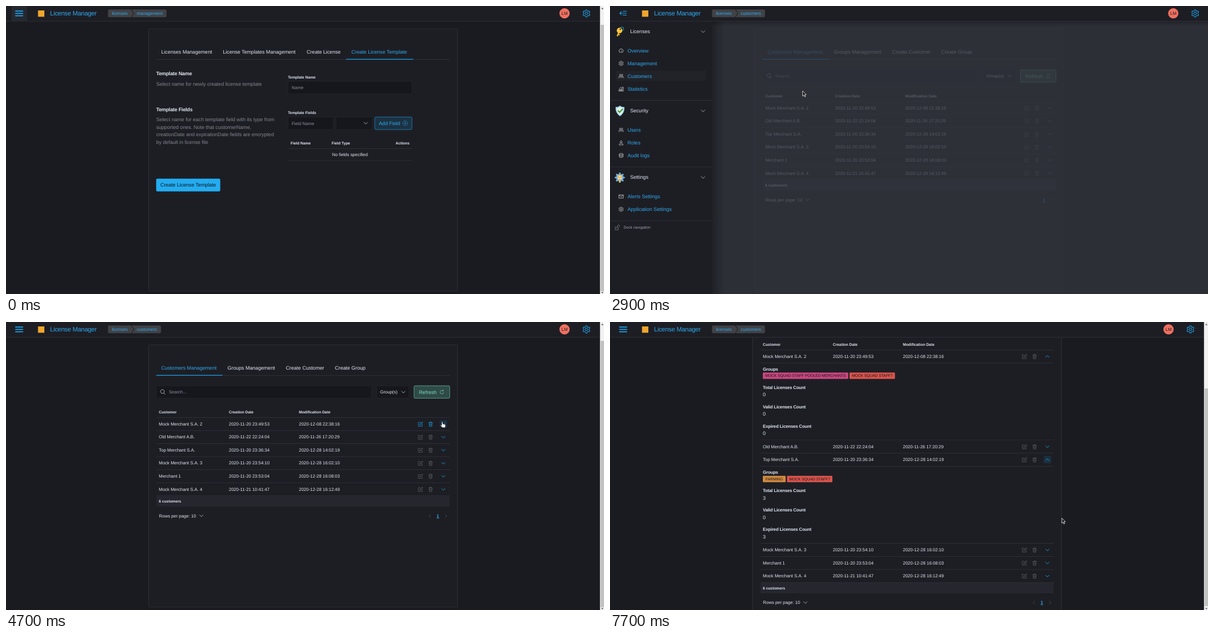
These frames come from a looping animation (1076x520 px, 8000 ms). An HTML page:

```html
<!DOCTYPE html>
<html lang="en">
<head>
<meta charset="utf-8">
<title>License Manager</title>
<style>
  html, body { margin: 0; width: 100%; height: 100%; overflow: hidden; background: #1a1b20; }
  svg { display: block; }
  text { font-family: "Liberation Sans", Arial, sans-serif; letter-spacing: -.005em; white-space: pre; text-rendering: geometricPrecision; }
  .title { font-weight: 700; letter-spacing: -.023em; }
  .logo { letter-spacing: -.025em; }
  .bold { font-weight: 700; }
  .line { text-decoration: underline; }
</style>
</head>
<body>
<script>
const LOOP = 8000, STEP = 100;
const BLUE = '#1ba9f5', LINK = '#2fa8ee', TEXT = '#dfe5ef', DIM = '#81858f', RULE = '#343741', PANEL = '#1d1e24';
const S = 9.184, M = 8.036, XS = 6.888;

const el = (parent, tag, attrs = {}) => {
  const n = document.createElementNS('http://www.w3.org/2000/svg', tag);
  for (const k in attrs) n.setAttribute(k, attrs[k]);
  parent.appendChild(n);
  return n;
};
const set = (n, attrs) => { for (const k in attrs) n.setAttribute(k, attrs[k]); };
const show = (n, on) => n.setAttribute('display', on ? 'inline' : 'none');
const move = (n, x, y) => n.setAttribute('transform', `translate(${x} ${y})`);
const group = parent => el(parent, 'g');
const rect = (p, x, y, w, h, fill, more = {}) => el(p, 'rect', { x, y, width: w, height: h, fill, ...more });
const hline = (p, x1, x2, y, color = RULE, w = .7) => rect(p, x1, y - w / 2, x2 - x1, w, color);
const path = (p, d, more) => el(p, 'path', { d, fill: 'none', ...more });

// y is the middle of the capitals
function text(p, x, y, str, size = S, fill = TEXT, cls = '', anchor = 'start') {
  const n = el(p, 'text', { x, y: y + size * .34, 'font-size': size, fill, class: cls, 'text-anchor': anchor });
  n.textContent = str;
  return n;
}

function gearPath(r, teeth = 6) {
  let d = '';
  for (let i = 0; i < teeth * 8; i++) {
    const a = i / (teeth * 8) * Math.PI * 2;
    const q = r * (.86 + .14 * Math.tanh(3 * Math.cos(a * teeth)));
    d += `${i ? 'L' : 'M'}${(8 + q * Math.sin(a)).toFixed(2)} ${(8 - q * Math.cos(a)).toFixed(2)}`;
  }
  return d + 'Z';
}

const ICONS = {
  gauge: 'M3 13A6.5 6.5 0 1 1 13 13ZM8 10l3-4',
  people: 'M5 2a2 2 0 1 1-.01 0M11 2a2 2 0 1 1-.01 0M1 14v-3l2-3h4l1 2 1-2h4l2 3v3M5 10v4M11 10v4',
  stats: 'M1 15v-4h4v4zM6 15V9h4v6zM11 15V3h4v12zM1 8l8-6',
  user: 'M8 2a3 3 0 1 1-.01 0M2 15c0-8 12-8 12 0z',
  logs: 'M2 4c0-3 12-3 12 0v8c0 3-12 3-12 0zM2 4c0 3 12 3 12 0M2 8c0 3 12 3 12 0',
  mail: 'M1 3h14v10H1zM1 3l7 6 7-6',
  lock: 'M2 7h9v8H2zM9 7V4a3 3 0 0 1 6 0v2M6.5 10v2',
  edit: 'M13.5 8v6.5H2V3h6M6 10.5l1-3 7-6 1.5 1.5-6.5 6.5z',
  trash: 'M2 4h12M6 4V2h4v2M3.5 4l1 11h7l1-11M6.5 7v5M9.5 7v5',
  down: 'M2 5l6 6 6-6', up: 'M2 11l6-6 6 6', left: 'M10 3l-5 5 5 5', right: 'M6 3l5 5-5 5',
  search: 'M11 11l4.5 4.5M7 1a5.7 5.7 0 1 1-.01 0',
  refresh: 'M13.5 8A5.5 5.5 0 1 1 11.5 3.8M12.3 1v3.2h-3.2',
  plus: 'M8 1a7 7 0 1 1-.01 0M8 4.5v7M4.5 8h7',
  gear: gearPath(7.2) + 'M8 5.5a2.5 2.5 0 1 1-.01 0'
};
const icon = (p, name, x, y, stroke, k = .574, w = 1.25) => path(p, ICONS[name], {
  stroke, 'stroke-width': w, 'stroke-linejoin': 'round',
  transform: `translate(${x - 8 * k} ${y - 8 * k}) scale(${k})`
});

const svg = el(document.body, 'svg', { width: 1076, height: 520, viewBox: '0 0 1076 520' });
const defs = el(svg, 'defs');
function shade(id, x2, y2) {
  const g = el(defs, 'linearGradient', { id, x1: 0, y1: 0, x2, y2 });
  el(g, 'stop', { offset: 0, 'stop-color': '#000', 'stop-opacity': .28 });
  el(g, 'stop', { offset: 1, 'stop-color': '#000', 'stop-opacity': 0 });
}
shade('toRight', 1, 0);
shade('toBottom', 0, 1);

rect(svg, 0, 0, 1076, 520, '#1a1b20');
const main = group(svg);
const panel = rect(main, 256.5, 41.3, 556, 473.4, PANEL, { stroke: RULE, 'stroke-width': .7, rx: 2.3 });

function tabs(p, list, active, x1, x2) {
  hline(p, 270.5, 798.5, 96.6);
  list.forEach(([x, str], i) => text(p, x, 83, str, S, i === active ? LINK : TEXT));
  hline(p, x1, x2, 96.2, BLUE, 1.2);
}
const box = (p, x, y, w, fill = '#16171c', stroke = '#27292f') =>
  rect(p, x, y, w, 22.6, fill, { stroke, 'stroke-width': .6, rx: fill === '#16171c' ? 0 : 2 });

// Template form
const form = group(main);
tabs(form, [[279.3, 'Licenses Management'], [390.3, 'License Templates Management'],
  [541, 'Create License'], [621.4, 'Create License Template']], 3, 612, 732.6);
text(form, 270.2, 122, 'Template Name', S, TEXT, 'title');
text(form, 270.2, 140.5, 'Select name for newly created license template', S, DIM);
text(form, 507.2, 128.4, 'Template Name', XS, TEXT, 'bold');
box(form, 507.5, 136, 223);
text(form, 514, 147.5, 'Name', M, '#8a909c');
text(form, 270.2, 186.4, 'Template Fields', S, TEXT, 'title');
['Select name for each template field with its type from', 'supported ones. Note that customerName,',
  'creationDate and expirationDate fields are encrypted', 'by default in license file']
  .forEach((s, i) => text(form, 270.2, 204.8 + i * 13.78, s, S, DIM));
text(form, 507.2, 192.8, 'Template Fields', XS, TEXT, 'bold');
box(form, 507.5, 200.4, 81.5);
text(form, 514, 212, 'Field Name', M, '#8a909c');
box(form, 594, 200.4, 64.8);
icon(form, 'down', 647.3, 211.5, TEXT);
box(form, 663.6, 200.4, 66.9, '#1c3243', BLUE);
text(form, 670.8, 211.8, 'Add Field', S, LINK);
icon(form, 'plus', 718.4, 211.6, LINK, .6, 1);
text(form, 512, 247.4, 'Field Name', XS, TEXT, 'bold');
text(form, 586, 247.4, 'Field Type', XS, TEXT, 'bold');
text(form, 726, 247.4, 'Actions', XS, TEXT, 'bold', 'end');
hline(form, 507.3, 730.5, 257.6);
text(form, 618.8, 268.3, 'No fields specified', M, TEXT, '', 'middle');
hline(form, 507.3, 730.5, 279.2);
rect(form, 270.2, 311.8, 115.3, 23, '#23acf1', { rx: 2.2 });
text(form, 327.8, 323.2, 'Create License Template', S, '#14151a', '', 'middle');

// Customers page
const list = group(main);
tabs(list, [[279.2, 'Customers Management'], [398.6, 'Groups Management'],
  [503.4, 'Create Customer'], [591.8, 'Create Group']], 0, 270.3, 389.5);
box(list, 270.6, 115.1, 387);
icon(list, 'search', 282, 126.3, TEXT, .6);
text(list, 293, 126.7, 'Search...', M, '#8a909c');
box(list, 667.3, 115.1, 57.6);
text(list, 673, 126.7, 'Group(s)', M);
icon(list, 'down', 715, 126.5, TEXT);
box(list, 734.2, 115.1, 64.2, '#2f4b47', '#7ddcc0');
text(list, 743, 126.5, 'Refresh', S, '#7ddcc0');
icon(list, 'refresh', 784.3, 126.6, '#7ddcc0');
[[275, 'Customer'], [401, 'Creation Date'], [527, 'Modification Date']]
  .forEach(([x, s]) => text(list, x, 162.2, s, XS, TEXT, 'bold'));
hline(list, 270.5, 798.5, 172.4);

const PITCH = 23.56, OPEN = 139.3;
const RED = '#d9544d';
const ROWS = [
  ['Mock Merchant S.A. 2', '2020-11-20 23:49:53', '2020-12-08 22:38:16'],
  ['Old Merchant A.B.', '2020-11-22 22:24:04', '2020-11-26 17:20:29'],
  ['Top Merchant S.A.', '2020-11-20 23:36:34', '2020-12-28 14:02:19'],
  ['Mock Merchant S.A. 3', '2020-11-20 23:54:10', '2020-12-28 16:02:10'],
  ['Merchant 1', '2020-11-20 23:53:04', '2020-12-28 16:08:03'],
  ['Mock Merchant S.A. 4', '2020-11-21 10:41:47', '2020-12-28 16:12:49']
];
const DETAILS = {
  0: { tags: [[275, 153.7, '#c9477f', 'MOCK SQUAD STAFF POOLED MERCHANTS'], [431, 81.7, RED, 'MOCK SQUAD STAFF7']], counts: [0, 0, 0] },
  2: { tags: [[275, 41, '#d08a40', 'FARMING'], [318.4, 81.7, RED, 'MOCK SQUAD STAFF7']], counts: [3, 0, 3] }
};

function makeDetails(p, { tags, counts }) {
  const d = el(p, 'svg', { x: 0, y: 12.2, width: 1076, height: 0, overflow: 'hidden' });
  text(d, 275, 10.7, 'Groups', M, TEXT, 'title');
  for (const [x, w, fill, s] of tags) {
    rect(d, x, 17.1, w, 11.5, fill, { rx: 1 });
    text(d, x + w / 2, 22.9, s, XS, '#121317', '', 'middle');
  }
  ['Total', 'Valid', 'Expired'].forEach((s, i) => {
    text(d, 275, 43.9 + i * 35.1, s + ' Licenses Count', M, TEXT, 'title');
    text(d, 275, 56.9 + i * 35.1, counts[i], S);
  });
  hline(d, 270.5, 798.5, OPEN - .4);
  return d;
}

const rows = ROWS.map((cells, i) => {
  const g = group(list);
  cells.forEach((s, c) => text(g, 275 + c * 126, 0, s, M));
  hline(g, 270.5, 798.5, 12);
  const glow = rect(g, 780.4, -6.6, 13.4, 13.2, '#1b3040', { rx: 1.5 });
  return {
    g, glow,
    acts: [icon(g, 'edit', 745.6, .2, DIM, .6), icon(g, 'trash', 764, .2, DIM, .6)],
    down: icon(g, 'down', 787, .2, BLUE, .55, 1.6), up: icon(g, 'up', 787, .2, BLUE, .55, 1.6),
    details: DETAILS[i] && makeDetails(g, DETAILS[i])
  };
});

const foot = group(list);
rect(foot, 270.5, 314.2, 528, 19.2, '#25262e');
text(foot, 275, 324, '6 customers', XS, TEXT, 'bold');
text(foot, 275.3, 350, 'Rows per page: 10', M);
icon(foot, 'down', 351.5, 349.8, TEXT);
icon(foot, 'left', 763, 350, '#535966');
text(foot, 777, 350, '1', M, LINK, 'bold line', 'middle');
icon(foot, 'right', 791.5, 350, '#535966');

const mask = rect(svg, 0, 0, 1076, 520, 'rgb(50,53,62)');

// Side navigation
const nav = group(svg);
rect(nav, 184, 27, 22, 493, 'url(#toRight)');
rect(nav, 0, 0, 184, 520, PANEL);
[170.6, 290.6, 388].forEach(y => hline(nav, 0, 184, y));
const focusBox = rect(nav, 162, 40.4, 11, 11.2, '#1b3040', { rx: 1.8, stroke: BLUE, 'stroke-width': .7 });
const heads = [['Licenses', 46], ['Security', 189], ['Settings', 309.3]].map(([s, y]) => {
  const arrow = icon(nav, 'down', 167.4, y + .2, TEXT);
  return { label: text(nav, 36.2, y, s), arrow };
});
const items = [['Overview', 80.4, 'gauge'], ['Management', 103.4, 'gear'], ['Customers', 126.4, 'people'],
  ['Statistics', 149.4, 'stats'], ['Users', 223.6, 'people'], ['Roles', 246.6, 'user'], ['Audit logs', 269.6, 'logs'],
  ['Alerts Settings', 343.8, 'mail'], ['Application Settings', 366.8, 'gear']].map(([s, y, name]) => {
  const glow = rect(nav, 10.5, y - 9.4, 162, 18.6, '#212329', { rx: 1.5 });
  icon(nav, name, 20, y + .2, TEXT);
  return { glow, label: text(nav, 31.5, y, s, S, LINK) };
});
icon(nav, 'lock', 13, 399.8, DIM, .62);
text(nav, 24.5, 400, 'Dock navigation', XS, '#98a2b3');
// key
path(nav, 'M18.5 41a3 3 0 1 1 4 3', { stroke: '#1d7f86', 'stroke-width': 1.5 });
path(nav, 'M17 45L13 54.5M14.5 51l3 1.2', { stroke: '#f0b429', 'stroke-width': 2.4 });
el(nav, 'circle', { cx: 17.2, cy: 44.2, r: 5, fill: '#fcc63d' });
el(nav, 'circle', { cx: 18.6, cy: 42, r: 1.3, fill: PANEL });
// shield
path(nav, 'M18 180q4 3 8 2.5q.5 11-8 16.5q-8.5-5.5-8-16.5q4 .5 8-2.5z', { fill: '#a9dcf5' });
path(nav, 'M18 182.8q3 2 5.8 2q0 7.7-5.8 11.6q-5.8-3.9-5.8-11.6q3 0 5.8-2z', { fill: '#eaf4dc' });
path(nav, 'M14.2 188.8l3 3 5.8-6', { stroke: '#3e9b46', 'stroke-width': 2.3 });
// cog with wrench
path(nav, gearPath(8, 8), { fill: '#6ea8dc', transform: 'translate(8.4 300.6) scale(1.15)' });
el(nav, 'circle', { cx: 17.6, cy: 309.8, r: 4, fill: '#dbe7f2' });
path(nav, 'M17.6 309v10M14.8 305v3.5q2.8 2.5 5.6 0V305', { stroke: '#f5bd3a', 'stroke-width': 2.6 });

// Header
const header = group(svg);
const headShade = rect(header, 184, 27.6, 892, 9, 'url(#toBottom)');
rect(header, 0, 0, 1076, 27.4, PANEL);
hline(header, 0, 1076, 27.3);
const menuGlow = rect(header, 10, 0, 28, 27, '#25282f');
const burger = path(header, 'M16.6 9.1h14.2M16.6 13.4h14.2M16.6 17.7h14.2', { stroke: BLUE, 'stroke-width': 1.7 });
const collapse = path(header, 'M23 9.5h7M17.5 13h12.5M23 16.5h7M20.7 9.8l-3.2 3.2 3.2 3.2', { stroke: BLUE, 'stroke-width': 1.1 });
rect(header, 57.6, 8, 11.4, 11.4, '#f0a62c');
text(header, 79.3, 13.4, 'License Manager', 11.48, LINK, 'logo');
const CRUMB = '#404246';
path(header, 'M186 6.3h38.8l4.7 7-4.7 7H186q-2.5 0-2.5-2.5v-9q0-2.5 2.5-2.5z', { fill: CRUMB });
text(header, 190.4, 13.4, 'licenses', M, LINK);
const crumb = (s, x2) => {
  const g = group(header);
  path(g, `M226 6.3H${x2 - 2.5}q2.5 0 2.5 2.5v9q0 2.5-2.5 2.5H226l4.7-7z`, { fill: CRUMB });
  text(g, 235.2, 13.4, s, M, LINK);
  return g;
};
const crumbs = [crumb('management', 288.8), crumb('customers', 278.8)];
const tools = group(header);
el(tools, 'circle', { cx: 1005, cy: 13.3, r: 9.2, fill: '#f0705f' });
text(tools, 1005, 13.4, 'LM', M, '#1a1b20', '', 'middle');
icon(tools, 'gear', 1044.4, 13.4, BLUE, .92, 1.1);

// Scrollbar, above the header
const bar = group(svg);
rect(bar, 1068.8, 0, 7.2, 520, '#f1f1f1');
const thumb = rect(bar, 1069.8, 34, 6.2, 481, '#c1c1c1');
path(bar, 'M1071 5.5l2-2.5 2 2.5zM1071 516.5l2 2.5 2-2.5z', { fill: '#505050' });

// Pointer
const pointer = group(svg);
const hand = path(pointer, 'M-1 .8q1-1.6 2 0V4l3.7 .9q1.4 .4 1.2 1.9l-.7 3.9h-5L-3.4 6.4q.9-1.2 2.4 .3z',
  { fill: '#fff', stroke: '#111', 'stroke-width': .6 });
const arrow = path(pointer, 'M0 0v9.3l2.1-2 1.5 3.4 1.5-.7-1.5-3.2h2.9z', { fill: '#111', stroke: '#fff', 'stroke-width': .8 });

// time, x, y, hand?
const TRACK = [
  [500, 29, 6, 1], [600, 26, 9, 1], [1600, 26, 9, 1], [1700, 27, 14, 1], [1800, 33, 42, 1], [1900, 41, 76, 1],
  [2000, 47, 95, 1], [2200, 53, 112, 1], [2500, 56, 121, 1], [2700, 56, 121, 1], [2800, 150, 135, 0],
  [3100, 740, 190, 0], [3300, 985, 214, 0], [3400, 1008, 217, 0], [3600, 940, 209, 0], [3800, 903, 205, 0],
  [3900, 900, 203, 0], [4000, 884, 200, 0], [4200, 812, 186, 0], [4300, 785, 180, 1], [5500, 785, 180, 1],
  [5600, 786, 181, 1], [5700, 786, 181, 1], [5800, 786, 186, 1], [5900, 787, 215, 0], [6200, 787, 345, 1],
  [6400, 787, 366, 1], [6700, 787, 367, 1], [6800, 790, 366, 1], [6900, 797, 363, 0], [7200, 811, 357, 0],
  [7300, 811, 357, 0], [7700, 813, 354, 0]
];
// time, value
const SCROLL = [[7300, 0], [7400, 24], [7500, 70], [7600, 108], [7700, 122]];
const HOVER = [
  [[4300, 0], [4700, 1], [5800, 1], [6000, 0]],
  [[6000, 0], [6200, .6], [6400, 0]],
  [[6200, 0], [6500, 1], [6800, 1], [7000, 0]]
];
const OPENING = { 0: [[4900, 0], [5000, .55], [5100, 1]], 2: [[6600, 0], [6700, 1]] };

function at(track, t, col = 1) {
  if (t <= track[0][0]) return track[0][col];
  for (let i = 1; i < track.length; i++) {
    const a = track[i - 1], b = track[i];
    if (t <= b[0]) return a[col] + (b[col] - a[col]) * (t - a[0]) / (b[0] - a[0]);
  }
  return track[track.length - 1][col];
}
const clamp = v => Math.max(0, Math.min(1, v));
const tint = k => `rgb(${[[98, 27], [101, 169], [109, 245]].map(([a, b]) => Math.round(a + (b - a) * k))})`;

function drawNav(t, open) {
  const p = clamp((t - 950) / 250), slide = p * p * (3 - 2 * p);
  [nav, mask, headShade].forEach(n => show(n, open));
  move(nav, -184 * (1 - slide), 0);
  set(nav, { opacity: slide });
  set(mask, { opacity: .8 * clamp((t - 950) / 150) });
  const focus = t < 2600;
  show(focusBox, focus);
  set(heads[0].label, { class: focus ? 'line' : '' });
  set(heads[0].arrow, { stroke: focus ? BLUE : TEXT });
  const over = t < 1900 || t >= 2800 ? -1 : t < 2100 ? 0 : t < 2200 ? 1 : 2;
  items.forEach((it, i) => {
    set(it.label, { class: i === over ? 'line' : '' });
    show(it.glow, i === over || (t >= 2800 && i === 2));
  });
}

function drawList(t) {
  let shift = 0;
  rows.forEach((r, i) => {
    move(r.g, 0, 184 + i * PITCH + shift);
    const k = HOVER[i] ? at(HOVER[i], t) : 0;
    r.acts.forEach(a => set(a, { stroke: tint(k) }));
    const open = OPENING[i] ? at(OPENING[i], t) : 0;
    show(r.up, open > 0);
    show(r.down, !open);
    show(r.glow, (i === 0 && t >= 4400 && t < 5900) || (i === 2 && t >= 6300));
    if (r.details) set(r.details, { height: open * OPEN });
    shift += open * OPEN;
  });
  move(foot, 0, shift);
  return shift;
}

function render(ms) {
  const t = Math.floor(ms / STEP) * STEP;
  const open = t >= 1000 && t < 3900, second = t >= 2700;
  show(form, !second);
  show(list, second);
  show(crumbs[0], !second);
  show(crumbs[1], second);
  const shift = drawList(t), scroll = at(SCROLL, t);
  set(panel, { height: Math.max(473.4, 334 + (second ? shift : 0)) });
  move(main, open ? 4.2 : 0, -scroll);
  move(tools, open ? 8.5 : 0, 0);
  show(bar, !open);
  const tall = shift > OPEN + 1;
  set(thumb, { y: tall ? 28 + scroll * .754 : 34, height: tall ? 393 : 481 });
  show(menuGlow, t < 1000);
  show(burger, !open);
  show(collapse, open);
  drawNav(t, open);
  show(pointer, t >= 500);
  move(pointer, at(TRACK, t), at(TRACK, t, 2));
  const isHand = at(TRACK, t, 3) > .99;
  show(hand, isHand);
  show(arrow, !isHand);
}

const start = performance.now();
function tick(now) {
  render(Math.max(0, now - start) % LOOP);
  requestAnimationFrame(tick);
}
render(0);
requestAnimationFrame(tick);
</script>
</body>
</html>
```
